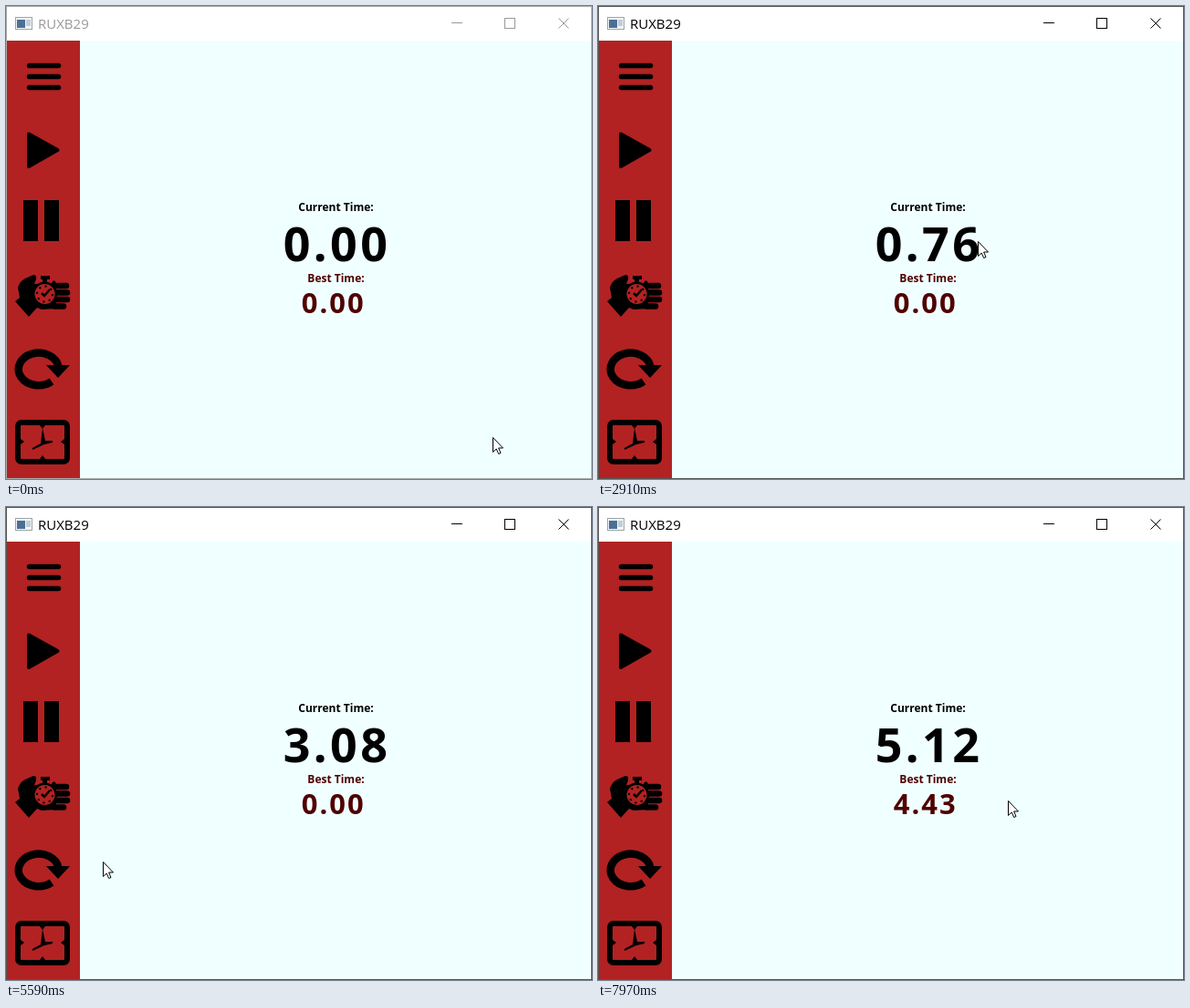
These frames come from a looping animation (642 px wide and 519 px high, 8000 ms). An HTML page:

```html
<!DOCTYPE html>
<html lang="en">
<head>
<meta charset="utf-8">
<title>Stopwatch</title>
<style>
  html, body { margin: 0; width: 100%; height: 100%; overflow: hidden; background: #fff; }
  svg { display: block; width: 642px; height: 519px; --frame: #555; --ink: #000; }
  svg.inactive { --frame: #aaa; --ink: #999; }
  .title { font: 15px "Open Sans", sans-serif; fill: var(--ink); }
  .label { font: bold 12px "Noto Sans", sans-serif; text-anchor: middle; }
  .digits { font: bold 52px "Noto Sans", sans-serif; letter-spacing: .065em; }
  .best { fill: #500000; }
  .digits.best { font-size: 31px; }
  .buttons { fill: none; stroke: var(--ink); }
  .cursor { fill: #fff; stroke: #000; stroke-linejoin: round; }
  .crisp { shape-rendering: crispEdges; }
  .line { fill: none; stroke: #000; }
  .red { fill: #b22222; }
</style>
</head>
<body>
<svg id="stage" viewBox="0 0 642 519">
  <rect width="642" height="519" fill="#fff"/>
  <rect x="81" y="38" width="560" height="480" fill="#f0ffff"/>
  <rect class="red" x="1" y="38" width="80" height="480"/>
  <rect x=".5" y=".5" width="641" height="518" fill="none" stroke="var(--frame)"/>

  <g class="crisp">
    <rect x="10.5" y="12.5" width="18" height="13" fill="#f4f6f6" stroke="#9aa6a6"/>
    <rect x="12" y="15" width="9" height="9" fill="#4a7096"/>
    <rect x="22" y="15" width="5" height="7" fill="#c0ced8"/>
  </g>
  <text class="title" x="35" y="25">RUXB29</text>
  <path class="buttons crisp" d="M488 18.5h12M546.5 13.5h11v11h-11z"/>
  <path class="buttons" d="M605.5 13.5l11 11m0-11l-11 11"/>

  <!-- menu, play, pause -->
  <path class="line" d="M25.5 65.5H57.5m-32 12H57.5m-32 12H57.5" stroke-width="5.5" stroke-linecap="round"/>
  <path d="M25 140.500L56.500 158L25 176z" stroke="#000" stroke-width="4" stroke-linejoin="round"/>
  <path d="M19 213h16v45H19zm23 0h16v45H42z"/>

  <!-- hand with stopwatch -->
  <path d="M10 324L15 320L13 309Q15 302 21 299L30 295Q34 295 33 300L31 305L55 304V332L39 333L34 331L25 341z"/>
  <path class="line" d="M53 307H66m-13 7.500H67m-14 7.500H67m-14 7.500H63" stroke-width="6.500" stroke-linecap="round"/>
  <circle cx="42.500" cy="316" r="13.500"/>
  <path d="M38 296h10v4h-3v4h-5v-4h-2zM50 303l3-2 2 3-3 2z"/>
  <circle class="red" cx="42.500" cy="316" r="11"/>
  <circle class="line" cx="42.500" cy="316" r="8.500" stroke-width="2" pathLength="24" stroke-dasharray="1 2"/>
  <path class="line" d="M39 315L42 318L48 311" stroke-width="2.500"/>

  <!-- reset -->
  <path class="line" d="M57.500 396A22 17.800 0 1 0 50 412" stroke-width="8.500"/>
  <path d="M44 394H70L57 408z"/>

  <!-- clock -->
  <rect class="line" x="13" y="457" width="54" height="43" rx="4" stroke-width="6"/>
  <path d="M37 460h6l-3 4zM37 497h6l-3-4zM16 475v6l4-3zM64 475v6l-4-3z"/>
  <path d="M38 480L40 463L43 477L51 477V479L42 481L29 487V485z"/>

  <text class="label" x="361.500" y="225">Current Time:</text>
  <text class="digits" id="current" x="303.700" y="279.500">0.00</text>
  <text class="label best" x="361.500" y="303">Best Time:</text>
  <text class="digits best" id="best" x="323.700" y="337.300">0.00</text>

  <g class="cursor" id="cursor">
    <path id="arrow" d="M.5.5V16.500L4.200 13L6.700 18.500L9 17.500L6.600 12H11.500z"/>
    <path id="hand" d="M-1.500 14V2Q-1.500.5 0 .5T1.500 2V8Q4 6.500 4.500 8.500Q7 7.500 7.300 9.500Q9.500 9 9.500 11.500V17Q9 20 7.500 21V23.500H-.5V21L-5 14.500Q-6 11.500-3.500 12z"/>
  </g>
</svg>
<script>
const LOOP = 8000, TICK = 76.5;   // the screen refreshes once per tick
const FOCUS = 6, NEW_BEST = 94;   // in ticks
const $ = id => document.getElementById(id);

// Key points: [tick, ...values]
const pointer = [
  [0, 533, 473], [4, 374, 242], [8, 374, 242],
  [13, 121, 289], [16, 329, 289], [18, 329, 289],
  [24, 18, 141], [29, 302, 238],                    // start
  [36, 447, 250], [47, 276, 293], [63, 96, 312],
  [65, 59, 325], [69, 473, 350], [73, 106, 389],
  [80, 32, 397], [87, 42, 312], [93, 42, 312],      // reset, then lap
  [95, 257, 335], [104, 449, 322]
];
const seconds = [[0, 0], [26.3, 0], [29, .18], [47, 1.33], [63, 2.39], [73, 3.08], [87, 4.02], [104, 5.12]];

function sample(keys, tick) {
  const i = Math.max(1, keys.findIndex(key => key[0] >= tick));
  const [from, ...a] = keys[i - 1], [to, ...b] = keys[i];
  const p = (tick - from) / (to - from);
  return a.map((v, n) => v + (b[n] - v) * p);
}

function draw(now) {
  const tick = Math.floor((now % LOOP + 10) / TICK);
  const [x, y] = sample(pointer, tick).map(Math.round);
  const overButton = x < 81;
  $("stage").classList.toggle("inactive", tick < FOCUS);
  $("current").textContent = sample(seconds, tick)[0].toFixed(2);
  $("best").textContent = tick < NEW_BEST ? "0.00" : "4.43";
  $("cursor").setAttribute("transform", `translate(${x} ${y})`);
  $("arrow").style.display = overButton ? "none" : "";
  $("hand").style.display = overButton ? "" : "none";
}

const start = performance.now();
function loop() {
  draw(performance.now() - start);
  requestAnimationFrame(loop);
}
loop();
</script>
</body>
</html>
```
